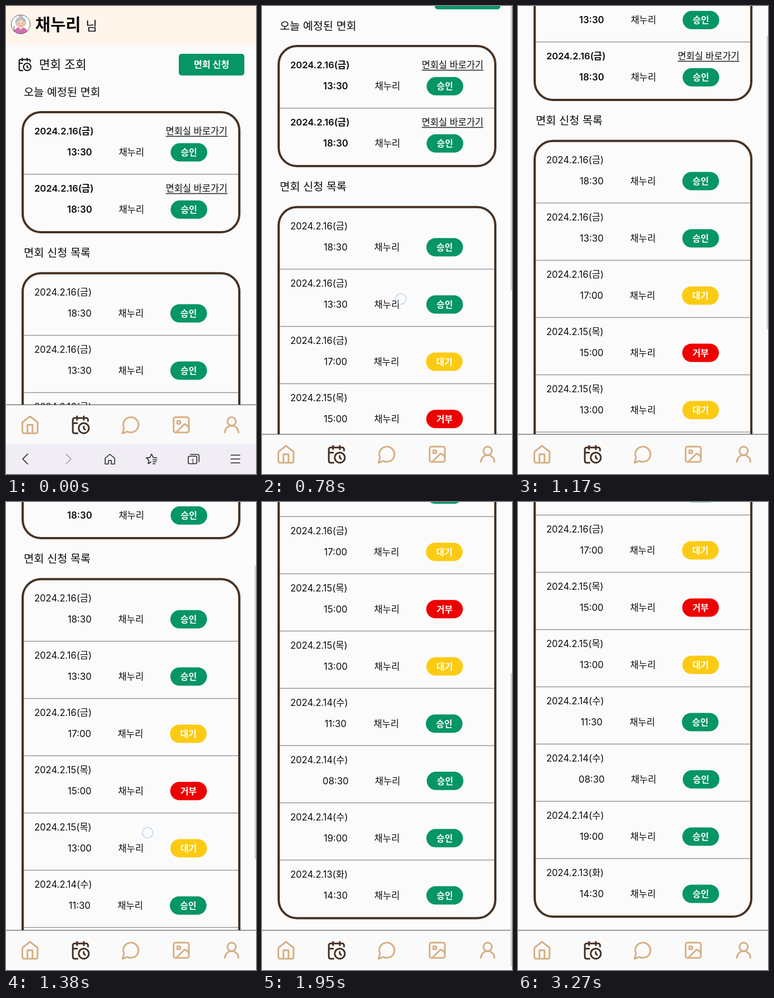
Animation, 450 px wide and 842 px high, one loop 3.33 s. Source, as an HTML page:

```html
<!DOCTYPE html>
<html lang="ko">
<head>
<meta charset="utf-8">
<title>면회 조회</title>
<style>
html, body { margin: 0; width: 100%; height: 100%; overflow: hidden; background: #fbfbfb; }
svg { display: block; width: 100%; height: 100%; }
text { font-family: Inter, 'Noto Sans CJK KR', 'Noto Sans CJK JP', 'Noto Sans CJK', sans-serif; }
.icon { fill: none; stroke-linecap: round; stroke-linejoin: round; }
</style>
</head>
<body>
<svg id="stage" viewBox="0 0 450 842" xmlns="http://www.w3.org/2000/svg"></svg>
<script>
const LOOP = 3330, STEP = 30, HEIGHT = 842, BAR = 53, ROW = 103;
const BROWN = '#463325', TAN = '#d9af82', NAME = '채누리';
const STATUS = { 승인: '#069566', 대기: '#fbcb14', 거부: '#ef0000' };

// Static drawing helpers
const text = (x, y, size, str, { weight = 400, anchor = 'start', fill = '#0c0c0c' } = {}) =>
  `<text x="${x}" y="${y}" font-size="${size}" font-weight="${weight}" text-anchor="${anchor}" fill="${fill}">${str}</text>`;
const rect = (x, y, w, h, fill, rx = 0) =>
  `<rect x="${x}" y="${y}" width="${w}" height="${h}" rx="${rx}" fill="${fill}"/>`;
const line = (x1, x2, y, color, width) =>
  `<path d="M${x1} ${y}H${x2}" stroke="${color}" stroke-width="${width}"/>`;
const icon = (cx, cy, scale, color, body, width = 2) =>
  `<g class="icon" transform="translate(${cx} ${cy}) scale(${scale}) translate(-12 -12)" stroke="${color}" stroke-width="${width}">${body}</g>`;

const ICONS = {
  home: '<path d="M3 9l9-7 9 7v11a2 2 0 0 1-2 2H5a2 2 0 0 1-2-2zM9 22V12h6v10"/>',
  calendar: '<path d="M21 7.5V6a2 2 0 0 0-2-2H5a2 2 0 0 0-2 2v14a2 2 0 0 0 2 2h3.5M16 2v4M8 2v4M3 10h5M17.5 17.5L16 16.3V14"/><circle cx="16" cy="16" r="6"/>',
  chat: '<path d="M7.9 20A9 9 0 1 0 4 16.1L2 22z"/>',
  image: '<rect x="3" y="3" width="18" height="18" rx="2"/><circle cx="9" cy="9" r="2"/><path d="M21 15l-3.1-3.1a2 2 0 0 0-2.8 0L6 21"/>',
  user: '<circle cx="12" cy="8" r="5"/><path d="M20 21a8 8 0 0 0-16 0"/>'
};

function visit(y, date, time, status, shift, today) {
  const weight = today ? 600 : 400, mid = y + 38, pill = 328.8 + shift * 0.6;
  return text(51, y + 6, 16.6, date, { weight }) +
    text(132.5, mid + 6, 16.8, time, { weight, anchor: 'middle' }) +
    text(225 + shift, mid + 6, 16.6, NAME, { anchor: 'middle' }) +
    rect(pill - 33, mid - 16.5, 66, 33, STATUS[status], 16.5) +
    text(pill, mid + 5.9, 16, status, { weight: 700, anchor: 'middle', fill: '#fff' }) +
    (today ? text(398.5, y + 6, 16.5, '면회실 바로가기', { anchor: 'end' }) + line(287.5, 398.5, y + 9.2, '#222', 1.3) : '');
}

function card(top, height, visits, today) {
  const first = top + 34.3;
  const rows = visits.map(([date, time, status, shift = 0], i) =>
    (i ? line(31, 419, first + i * ROW - 25.5, '#999', 1.4) : '') +
    visit(first + i * ROW, date, time, status, shift, today)).join('');
  return rows + `<rect x="30" y="${top}" width="390" height="${height}" rx="33" fill="none" stroke="${BROWN}" stroke-width="4"/>`;
}

const avatar = `<g transform="translate(26.5 33)">
  <circle r="17" fill="#fff"/>
  <path d="M-12 12Q-9 5 0 5T12 12A17 17 0 0 1-12 12z" fill="#d36fb4"/>
  <path d="M-4 5L0 10 4 5z" fill="#f7e3ee"/>
  <circle cy="-13" r="3.6" fill="#b9bcc1"/>
  <circle cy="-4" r="9.8" fill="#b9bcc1"/>
  <path d="M-7.5-4Q-3-5 0-10 3-5 7.5-4 8 6 0 6.500T-7.500-4z" fill="#fbd3b4"/>
  <g fill="#f3a59b"><circle cx="-4.600" cy="1" r="1.500"/><circle cx="4.600" cy="1" r="1.500"/></g>
  <path class="icon" d="M-4.500-2q1-1 2 0M2.500-2q1-1 2 0M-2 2.500q2 1.800 4 0" stroke="#77554a" stroke-width=".8"/>
  <path class="icon" d="M-12 3V13" stroke="#8c5a44" stroke-width="1.200"/>
  <circle r="17" fill="none" stroke="#5b5660" stroke-width="1"/>
</g>`;

const today = [['2024.2.16(금)', '13:30', '승인', 0.8], ['2024.2.16(금)', '18:30', '승인', 0.8]];
const requests = [
  ['2024.2.16(금)', '18:30', '승인'],
  ['2024.2.16(금)', '13:30', '승인'],
  ['2024.2.16(금)', '17:00', '대기', -1],
  ['2024.2.15(목)', '15:00', '거부', -0.3],
  ['2024.2.15(목)', '13:00', '대기'],
  ['2024.2.14(수)', '11:30', '승인', -1.4],
  ['2024.2.14(수)', '08:30', '승인', 1.2],
  ['2024.2.14(수)', '19:00', '승인'],
  ['2024.2.13(화)', '14:30', '승인', 0.2]
];

const page = rect(0, 0, 450, 69, '#fff5eb') + avatar +
  text(52.5, 44, 29.8, NAME, { weight: 700 }) + text(143.5, 43.5, 22.5, '님') +
  icon(33.7, 105.2, 1.1, '#161616', ICONS.calendar) +
  text(59.5, 112.5, 21.5, '면회 조회') +
  rect(311, 86, 118, 39, STATUS.승인, 5) +
  text(370, 111.2, 16.4, '면회 신청', { weight: 700, anchor: 'middle', fill: '#fff' }) +
  text(32, 161.5, 19.7, '오늘 예정된 면회') +
  card(191, 216, today, true) +
  text(32, 451, 19.8, '면회 신청 목록') +
  card(480.7, 937.3, requests, false);

const nav = rect(0, 717, 450, 140, '#fafafa') + line(0, 450, 717.5, '#4a4644', 1.2) +
  Object.entries(ICONS).map(([key, body], i) =>
    icon(43.2 + 90.75 * i, 753.5, 1.52, key === 'calendar' ? BROWN : TAN, body)).join('');

const INK = '#26242b';
const toolbar = rect(0, 788, 450, 60, '#f1edf4') +
  icon(35, 815, 1, INK, '<path d="M16 3L7 12l9 9"/>', 1.7) +
  icon(112, 815, 1, '#a5a2aa', '<path d="M8 3l9 9-9 9"/>', 1.7) +
  icon(187, 815, 1, INK, '<path d="M3.500 10.500L12 3.500l8.500 7V21h-6v-6.500h-5V21h-6z"/>', 1.6) +
  icon(262, 815, 1, INK, '<path d="M11 17.500L6 20.500l1.300-6L2.500 10l6.400-.6L12 3l3 6.400 6.500.6M14.500 13.500h7M14.500 17h6M14.500 20.500h4"/>', 1.6) +
  icon(338, 815, 1, INK, '<rect x="2" y="7" width="15.500" height="13.500" rx="2.500"/><path d="M6 3.800h12.500a3 3 0 0 1 3 3V17"/>', 1.6) +
  text(335.8, 822.6, 10.5, '1', { anchor: 'middle', fill: INK }) +
  icon(413, 815, 1, INK, '<path d="M4 5h16M4 12h16M4 19h16"/>', 1.6);

const stage = document.getElementById('stage');
stage.innerHTML = rect(0, 0, 450, HEIGHT, '#fbfbfb') +
  `<g id="view"><g id="page">${page}</g><g id="nav">${nav}</g></g><g id="toolbar">${toolbar}</g>` +
  '<rect id="thumb" x="447.700" width="2.600" height="528" rx="1" fill="#cfcfd1"/>' +
  '<circle id="touch" r="9.500" fill="#fff" fill-opacity=".25" stroke="#a9caf2" stroke-width="1.200"/>';
const [view, pageEl, navEl, toolbarEl, thumb, touch] =
  ['view', 'page', 'nav', 'toolbar', 'thumb', 'touch'].map(id => document.getElementById(id));

// Monotone cubic curve through [time, value] points
function track(points) {
  const slope = i => (points[i + 1][1] - points[i][1]) / (points[i + 1][0] - points[i][0]);
  const tangents = points.map((_, i) => {
    if (i === 0 || i === points.length - 1) return 0;
    const a = slope(i - 1), b = slope(i);
    return a * b > 0 ? 2 * a * b / (a + b) : 0;
  });
  return t => {
    if (t <= points[0][0]) return points[0][1];
    const i = points.findIndex(p => p[0] >= t) - 1;
    if (i < 0) return points[points.length - 1][1];
    const [t0, v0] = points[i], [t1, v1] = points[i + 1];
    const h = t1 - t0, u = (t - t0) / h, w = 1 - u;
    return v0 * (1 + 2 * u) * w * w + tangents[i] * h * u * w * w +
      v1 * u * u * (3 - 2 * u) - tangents[i + 1] * h * u * u * w;
  };
}

const scrollAt = track([[390, 0], [600, 44], [780, 119], [880, 164], [1010, 210], [1170, 238],
  [1230, 250], [1380, 342], [1530, 426], [1680, 536], [1760, 601], [1850, 647], [1990, 672]]);
const stretchAt = track([[2010, 0], [2130, 0.005], [2240, 0.0072], [2310, 0.0053], [2400, 0.002], [2535, 0]]);
const swipes = [
  { from: 420, to: 870, x: track([[420, 243], [780, 250], [870, 254]]), y: t => 646 - scrollAt(t) },
  { from: 1200, to: 1710, x: track([[1200, 249], [1380, 255], [1680, 282]]),
    y: track([[1200, 694], [1230, 688], [1380, 595], [1530, 511], [1680, 433], [1710, 425]]) },
  { from: 2010, to: 2370, x: track([[2010, 252], [2310, 263], [2370, 264]]),
    y: track([[2010, 640], [2160, 570], [2310, 508.5], [2370, 500]]) }
];

function draw(t) {
  const scroll = scrollAt(t), hidden = Math.min(BAR, scroll);
  const move = (el, y) => el.setAttribute('transform', `translate(0 ${y})`);
  move(pageEl, -scroll);
  move(navEl, hidden);
  move(toolbarEl, hidden * 54 / BAR);
  view.setAttribute('transform', `translate(0 ${HEIGHT}) scale(1 ${1 + stretchAt(t)}) translate(0 ${-HEIGHT})`);

  thumb.setAttribute('y', 0.59 * scroll - 87);
  thumb.setAttribute('opacity', t < 420 || t >= 3240 ? 0 : t >= 3180 ? 0.5 : 1);

  const swipe = swipes.find(s => t >= s.from && t < s.to);
  touch.setAttribute('opacity', swipe ? 1 : 0);
  if (swipe) {
    touch.setAttribute('cx', swipe.x(t));
    touch.setAttribute('cy', swipe.y(t));
  }
}

const start = performance.now();
function tick() {
  const t = (performance.now() - start) % LOOP;
  draw(Math.floor(t / STEP) * STEP);
  requestAnimationFrame(tick);
}
tick();
</script>
</body>
</html>
```
